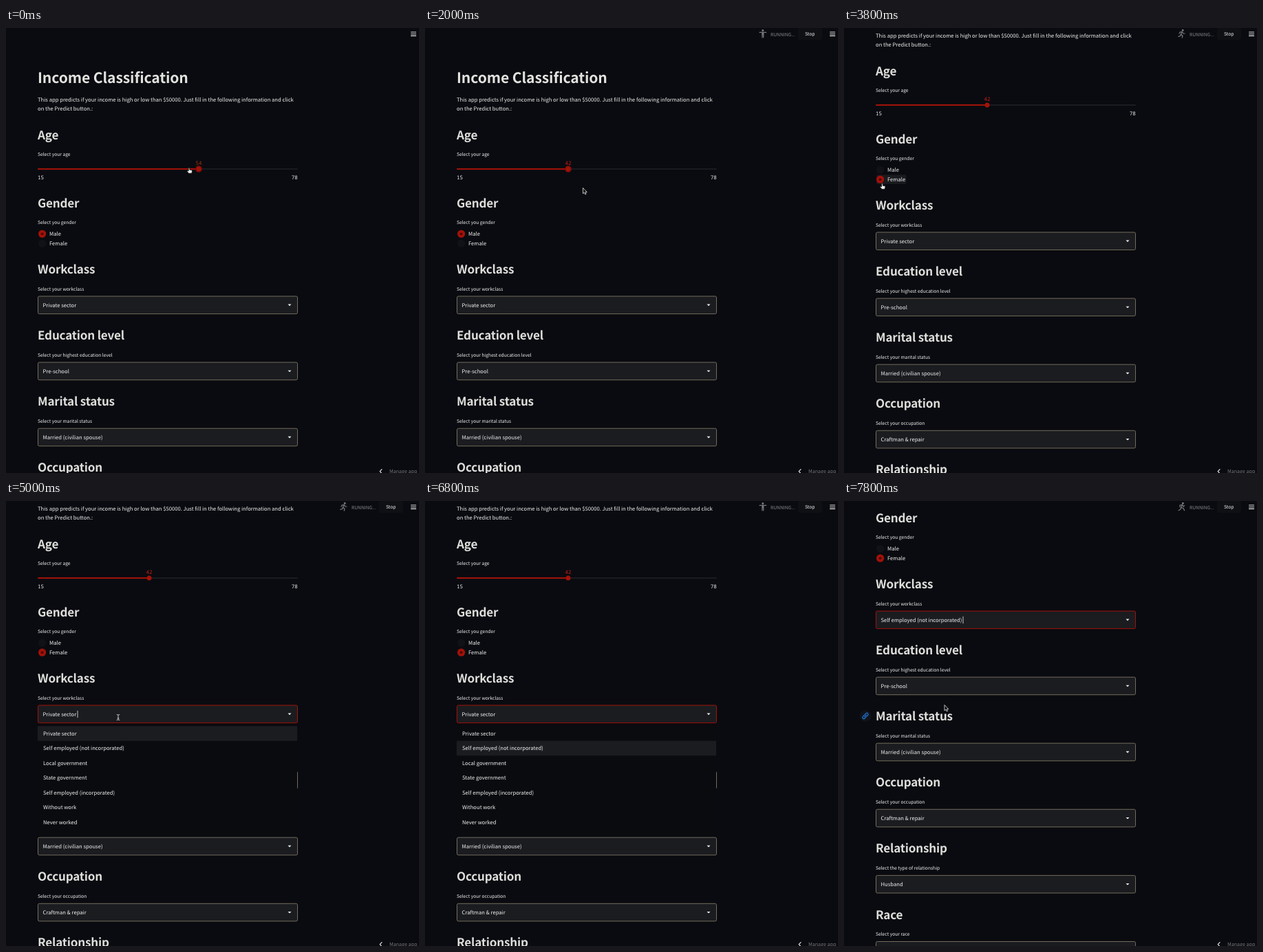
Recreate the animation shown at these times as an HTML page. Size 600 by 647 pixels, loop 8000 ms.

```html
<!DOCTYPE html>
<html lang="en">
<head>
<meta charset="utf-8">
<title>Income Classification</title>
<style>
  html, body { margin: 0; width: 100%; height: 100%; overflow: hidden; background: #0a0b10; }
  svg { display: block; width: 600px; height: 647px; }
  text {
    font: 7.67px "Noto Sans CJK SC", "Noto Sans CJK JP", "Noto Sans CJK", "Open Sans", sans-serif;
    fill: #f1f1f0; text-rendering: geometricPrecision; white-space: pre;
  }
  .title { font-size: 21.1px; font-weight: 700; letter-spacing: -.005em; fill: #e2e2df; }
  .heading { font-size: 17.1px; font-weight: 700; letter-spacing: -.012em; fill: #dededb; }
  .label { font-size: 6.71px; }
  .number { font: 7.6px "Noto Sans Mono", "DejaVu Sans Mono", monospace; }
  .field { fill: #1b1c20; stroke: #726c5b; stroke-width: 1; }
  .focused { stroke: #a11209; }
  .red { fill: #a11209; }
  .line { fill: none; stroke-linecap: round; stroke-linejoin: round; }
  .pointer { stroke-linejoin: round; stroke-width: .8; }
</style>
</head>
<body>
<svg id="stage" viewBox="0 0 600 647">
  <defs>
    <clipPath id="menuClip"><rect x="45" y="417" width="379" height="159.3"/></clipPath>
  </defs>
  <g id="page"></g>
  <g id="running">
    <g id="athlete" class="line" stroke="#77787b" stroke-width="1.25"></g>
    <text class="label" x="502" y="12" style="fill:#85868a">RUNNING...</text>
    <rect x="542" y="0" width="35" height="17" rx="2" fill="#0e1014"/>
    <text class="label" x="552" y="11">Stop</text>
  </g>
  <path class="line" d="M588.5 6h7M588.5 8.7h7M588.5 11.4h7" stroke="#e4e4e4" stroke-width="1.1"/>
  <path class="line" d="M546 641.7l-2.8 3 2.8 3" stroke="#e4e4e4" stroke-width="1.2"/>
  <text x="557" y="647.3" style="font-size:7.1px;fill:#77787c">Manage app</text>
  <g id="cursor">
    <path id="arrow" class="pointer" d="M0 0V8.3L1.9 6.6 3.2 9.4 4.6 8.8 3.4 6.1H5.8Z" fill="#08090c" stroke="#e6e6e6"/>
    <path id="hand" class="pointer" d="M-.9 .6Q0-.6 .8 .6V3.1L3.9 3.8Q4.8 4 4.5 5.2L3.8 8.3H-.6L-3 5.2Q-3 4-1.8 4.4L-.9 5Z" fill="#f2f2f2" stroke="#111"/>
    <path id="ibeam" class="line" d="M-1.8-4Q0-4 0-3 0-4 1.8-4M0-3V3M-1.8 4Q0 4 0 3 0 4 1.8 4M-1 1.4H1" stroke="#d5d5d5" stroke-width=".9"/>
  </g>
</svg>
<script>
const LOOP = 8000, STEP = 200;
const $ = id => document.getElementById(id);
const show = (id, on) => $(id).setAttribute('display', on ? 'inline' : 'none');
const move = (id, x, y) => $(id).setAttribute('transform', `translate(${x} ${y})`);
const text = (x, y, s, cls = '', id = '') => `<text x="${x}" y="${y}" class="${cls}" id="${id}">${s}</text>`;

const sections = [
  ['Workclass', 'Select your workclass', 'Private sector'],
  ['Education level', 'Select your highest education level', 'Pre-school'],
  ['Marital status', 'Select your marital status', 'Married (civilian spouse)'],
  ['Occupation', 'Select your occupation', 'Craftman &amp; repair'],
  ['Relationship', 'Select the type of relationship', 'Husband'],
  ['Race', 'Select your race', 'White'],
];
const options = ['Private sector', 'Self employed (not incorporated)', 'Local government', 'State government',
  'Self employed (incorporated)', 'Without work', 'Never worked', 'Unknown'];
const sectionY = i => 357 + 96.1 * i;
const ROW = 21.48, MENU_TOP = 420.3, GENDER_Y = 260.6;

const header = (y, title, label) => text(46, y, title, 'heading') + text(46, y + 24.5, label, 'label');

const select = ([title, label, value], i) => {
  const y = sectionY(i);
  return header(y, title, label) +
    `<rect class="field" id="field${i}" x="46.5" y="${y + 33}" width="377" height="25.6" rx="2"/>` +
    text(53.5, y + 48.5, value, '', 'value' + i) +
    `<path d="M409.5 ${y + 44.6}h5l-2.5 2.6z" fill="#eee"/>`;
};

const radio = (y, label) =>
  `<circle cx="52.6" cy="${y}" r="5.6" fill="#111217"/>` + text(63, y + 2.9, label);

const menu = () => `<g id="menu" clip-path="url(#menuClip)">
  <rect x="45.5" y="417.5" width="377.5" height="159" fill="#0a0b0f"/>
  <rect id="highlight" x="46" y="${MENU_TOP}" width="377" height="${ROW}" fill="#1b1c20"/>
  ${options.map((o, i) => text(54, MENU_TOP + 13.5 + i * ROW, o)).join('')}</g>`;

$('page').innerHTML =
  text(46, 80, 'Income Classification', 'title') +
  text(46, 106.8, 'This app predicts if your income is high or low than $50000. Just fill in the following information and click') +
  text(46, 120.4, 'on the Predict button.:') +
  header(161.8, 'Age', 'Select your age') +
  `<rect x="46" y="204" width="378" height="2.1" rx="1" fill="#1a1b20"/>
   <rect class="red" id="filled" x="46" y="204" height="2.1" rx="1"/>
   <g id="thumb"><circle id="halo" r="4.9" fill="#6d0d08"/><circle class="red" r="3.5"/>
   ${text(0, -6.1, '', 'number', 'age')}</g>` +
  text(46, 219.6, '15', 'number') + text(414.8, 219.6, '78', 'number') +
  header(GENDER_Y, 'Gender', 'Select you gender') +
  `<rect id="hover" x="47" y="306.5" width="43.5" height="13.2" rx="2" fill="#1a1b1f"/>` +
  radio(299.3, 'Male') + radio(313.2, 'Female') +
  `<g id="choice"><circle class="red" r="5.6"/><circle r="1.9" fill="#4d0906"/></g>` +
  sections.map(select).join('') +
  `<path id="caret" stroke="#eee" stroke-width=".8"/>` + menu() +
  `<g id="link"><circle r="8.5" fill="#10131a"/>
   <g class="line" transform="rotate(-45)" stroke="#2277d4" stroke-width="1.15">
   <path d="M-.6 1.9H-3.2a1.9 1.9 0 0 1 0-3.8H-.6M.6-1.9H3.2a1.9 1.9 0 0 1 0 3.8H.6M-2 0H2"/></g></g>`;
$('age').setAttribute('text-anchor', 'middle');

const head = (x, y) => `<circle cx="${x}" cy="${y}" r=".9" fill="#77787b"/>`;
const cyclist = head(491.6, 3.4) + '<path stroke-width="1" d="M491 5.2L488.6 7.6 491.3 9.2V11.8M490.4 6.3L493 7.5H494.5"/>' +
  '<g stroke-width=".9"><circle cx="487.2" cy="11" r="2.7"/><circle cx="494.9" cy="11" r="2.7"/></g>';
const runner = head(492.2, 3.2) + '<path d="M490.9 5.3L489.5 9.3 492 11.2 491.3 14.2M489.4 9.5L488.4 11.7 485.8 12.3M487 8.2L488.2 5.8 491 5.5 492.8 7.8 495 8"/>';
const sprinter = head(492.4, 3.2) + '<path d="M491.2 5.2L489.8 9.2 493 10.6 494.6 13.8M489.7 9.4L489 12 486 13.7M488 8.8V6L491.2 5.4 493.2 8 494.6 6.6"/>';
const gymnast = head(490.8, 3.6) + '<path d="M486 6.3H495.7M490.8 6.2V9.6M489.9 6.8V13.8M491.7 6.8V13.8"/>';
const athletes = [cyclist, runner, runner, sprinter, gymnast, gymnast];

// Each key is [step, ...values]; values between keys are linear.
const ageKeys = [[0, 54], [1, 50], [2, 47], [4, 42]];
const scrollKeys = [[10, 0], [11, 55], [12, 93], [35, 93], [36, 112], [37, 170], [38, 214], [39, 230]];
const cursorKeys = [
  [0, 266, 203], [4, 209, 204], [5, 209, 206], [8, 228, 231], [10, 229.5, 232.5], [12, 231, 234.5],
  [13, 225, 234], [16, 70, 222], [17, 55, 221], [19, 55.5, 226], [21, 90, 262], [22, 140, 335],
  [23, 160, 345], [24, 163, 318], [25, 163, 314.5], [29, 163, 318], [31, 140, 352], [32, 130, 359],
  [35, 130, 359], [36, 140, 330], [38, 146, 296.5],
];
const kinds = [[0, 'hand'], [6, 'arrow'], [16, 'hand'], [20, 'arrow'], [24, 'ibeam'], [28, 'hand'], [33, ''], [35, 'arrow']];
const links = [[0, null], [11, GENDER_Y], [14, null], [21, sectionY(0)], [22, sectionY(1)], [24, null],
  [36, sectionY(1)], [37, null], [38, sectionY(2)]];

const held = (keys, n) => keys.filter(k => k[0] <= n).pop()[1];
function tween(keys, n) {
  const next = keys.findIndex(k => k[0] > n);
  if (next < 0) return keys[keys.length - 1].slice(1);
  if (next === 0) return keys[0].slice(1);
  const a = keys[next - 1], b = keys[next], p = (n - a[0]) / (b[0] - a[0]);
  return a.slice(1).map((v, i) => v + (b[i + 1] - v) * p);
}

function draw(n) {
  const [scroll] = tween(scrollKeys, n);
  move('page', 0, -scroll);

  const age = Math.round(tween(ageKeys, n)[0]);
  const thumbX = 46 + 378 * (age - 15) / 63;
  $('filled').setAttribute('width', thumbX - 46);
  move('thumb', thumbX, 205);
  $('age').textContent = age;
  $('age').style.fill = n < 1 ? '#a5340f' : '#c91d14';

  const female = n >= 18;
  show('halo', !female);
  show('hover', n >= 17 && n < 20);
  move('choice', 52.6, female ? 313.2 : 299.3);

  const [x, y] = tween(cursorKeys, n);
  const kind = held(kinds, n);
  move('cursor', x, y);
  for (const k of ['arrow', 'hand', 'ibeam']) show(k, k === kind);

  const focused = n >= 25, chosen = n >= 35;
  $('field0').classList.toggle('focused', focused);
  $('value0').textContent = options[chosen ? 1 : 0];
  show('menu', focused && !chosen);
  $('highlight').setAttribute('y', MENU_TOP + (y > 348.5 ? ROW : 0));
  const caretX = chosen ? 173 : 104;
  $('caret').setAttribute('d', `M${caretX} 397.8v10.4`);
  show('caret', focused && Math.floor((n - 25) * STEP / 500) % 2 === (chosen ? 1 : 0));

  const linkY = held(links, n);
  show('link', linkY !== null);
  move('link', 31, (linkY || 0) - 6.8);

  show('running', n >= 5);
  $('athlete').innerHTML = athletes[n % athletes.length];
}

let last = -1;
function tick() {
  const n = Math.floor(performance.now() % LOOP / STEP);
  if (n !== last) draw(last = n);
  requestAnimationFrame(tick);
}
tick();
</script>
</body>
</html>
```
